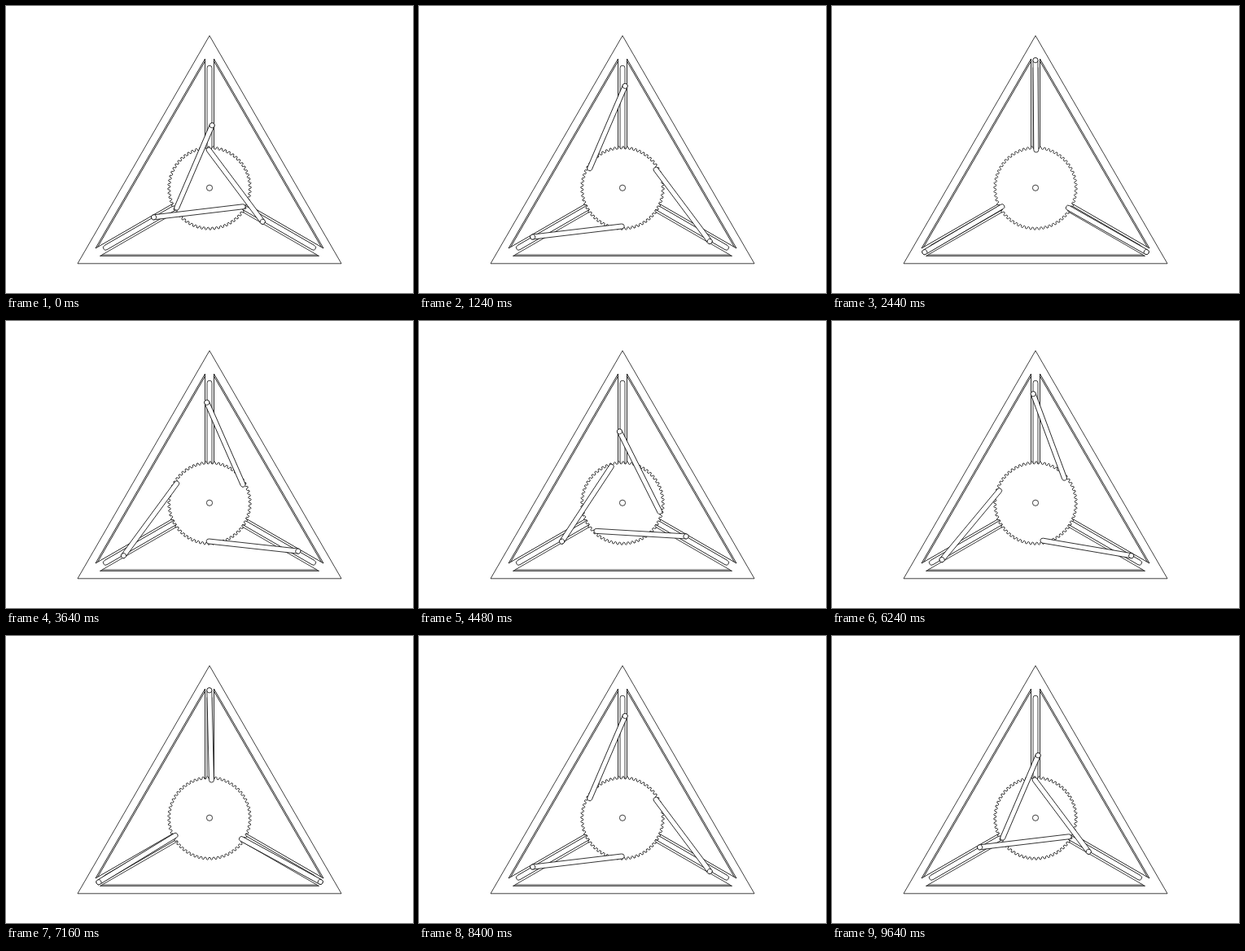
Write an HTML page that moves like this. It is 500x353 px and loops after 9.68 s.

```html
<!DOCTYPE html>
<html lang="en">
<head>
<meta charset="utf-8">
<title>Three-slider crank</title>
<style>
  html, body { margin: 0; width: 100%; height: 100%; overflow: hidden; background: #fff; }
  svg { display: block; width: 100vw; height: 100vh; }
  svg * { fill: #fff; stroke: #000; stroke-width: .75; }
  svg .line { fill: none; }
</style>
</head>
<body>
<svg id="stage" viewBox="0 0 500 353"></svg>
<script>
const stage = document.getElementById('stage');
const STEP = 40, HALF = 121;          // ms per step, steps per sweep
const CRANK = 47, ROD = 110.3, OVER = 3.7;
const TEETH = 60, ROOT = 48.2, TIP = 51.6;
const CX = 250, CY = 224, FRAME_Y = 223.5;
const rad = d => d * Math.PI / 180;

function add(parent, tag, attrs) {
  const el = document.createElementNS('http://www.w3.org/2000/svg', tag);
  for (const key in attrs) el.setAttribute(key, attrs[key]);
  parent.appendChild(el);
  return el;
}

function group(angle, y) {
  return add(stage, 'g', { transform: `translate(${CX} ${y}) rotate(${angle})` });
}

function gearPath() {
  const at = (r, turn) => {
    const a = turn * 2 * Math.PI / TEETH;
    return (r * Math.sin(a)).toFixed(2) + ' ' + (-r * Math.cos(a)).toFixed(2);
  };
  let d = 'M' + at(ROOT, -0.25);
  for (let i = 0; i < TEETH; i++) {
    d += `L${at(TIP - 1, i - 0.21)}Q${at(TIP + .6, i)} ${at(TIP - 1, i + 0.21)}`;
    d += `L${at(ROOT + .7, i + 0.27)}Q${at(ROOT - .6, i + 0.5)} ${at(ROOT + .7, i + 0.73)}`;
  }
  return d + 'Z';
}

// Fixed plate: triangle, three panels, three slots
add(stage, 'path', { d: 'M250 36.5L412 316.8H88Z' });
const arms = [0, 120, 240];
for (const a of arms) {
  const g = group(a, FRAME_Y);
  const gap = 5.5, edge = 84;
  // panel half-width at a given distance from the centre
  const reach = dist => (dist - gap * 2) * Math.sqrt(3) + gap * Math.sqrt(3) + gap / Math.sqrt(3) * 2 - gap * 0.02;
  const tip = (edge * 2 - gap * Math.sqrt(3));
  const far = { x: tip * Math.sin(rad(60)) - gap * Math.cos(rad(60)) };
  const side = add(g, 'g', { transform: 'rotate(180)' });
  const apex = gap / Math.sin(rad(60));
  add(side, 'path', { class: 'line', d: `M${-far.x} ${-edge}H${far.x}L0 ${-apex}Z` });
  const inner = far.x - 1.5 * Math.sqrt(3);
  add(side, 'path', { class: 'line', d: `M${-inner} ${1.5 - edge}H${inner}` });
}
for (const a of arms) {
  add(group(a, FRAME_Y), 'rect', { x: -3, y: -150.3, width: 6, height: 125, rx: 3 });
}

const gear = add(group(0, CY), 'path', { d: gearPath() });
add(stage, 'circle', { cx: CX, cy: CY - .3, r: 3.6 });

const links = arms.map(a => {
  const g = group(a, CY);
  return {
    rod: add(g, 'rect', { x: -3, y: -ROD - 3, width: 6, height: ROD + 6, rx: 3 }),
    pin: add(g, 'circle', { r: 3.1 })
  };
});

function draw(ms) {
  const n = Math.floor(ms / STEP) % (HALF * 2);
  const step = n < HALF ? n : HALF * 2 - 1 - n;
  const turn = step * 2 - 121;
  const s = Math.sin(rad(turn)), c = Math.cos(rad(turn));
  const x = CRANK * s, y = -CRANK * c;
  const px = -OVER * s;
  const rise = Math.sqrt(ROD * ROD - (x - px) ** 2);
  const tilt = Math.atan2(px - x, rise) * 180 / Math.PI;

  gear.setAttribute('transform', `rotate(${turn})`);
  for (const { rod, pin } of links) {
    rod.setAttribute('transform', `translate(${x} ${y}) rotate(${tilt})`);
    pin.setAttribute('cx', px);
    pin.setAttribute('cy', y - rise);
  }
}

const start = performance.now();
function tick() {
  draw(performance.now() - start);
  requestAnimationFrame(tick);
}
draw(0);
requestAnimationFrame(tick);
</script>
</body>
</html>
```
